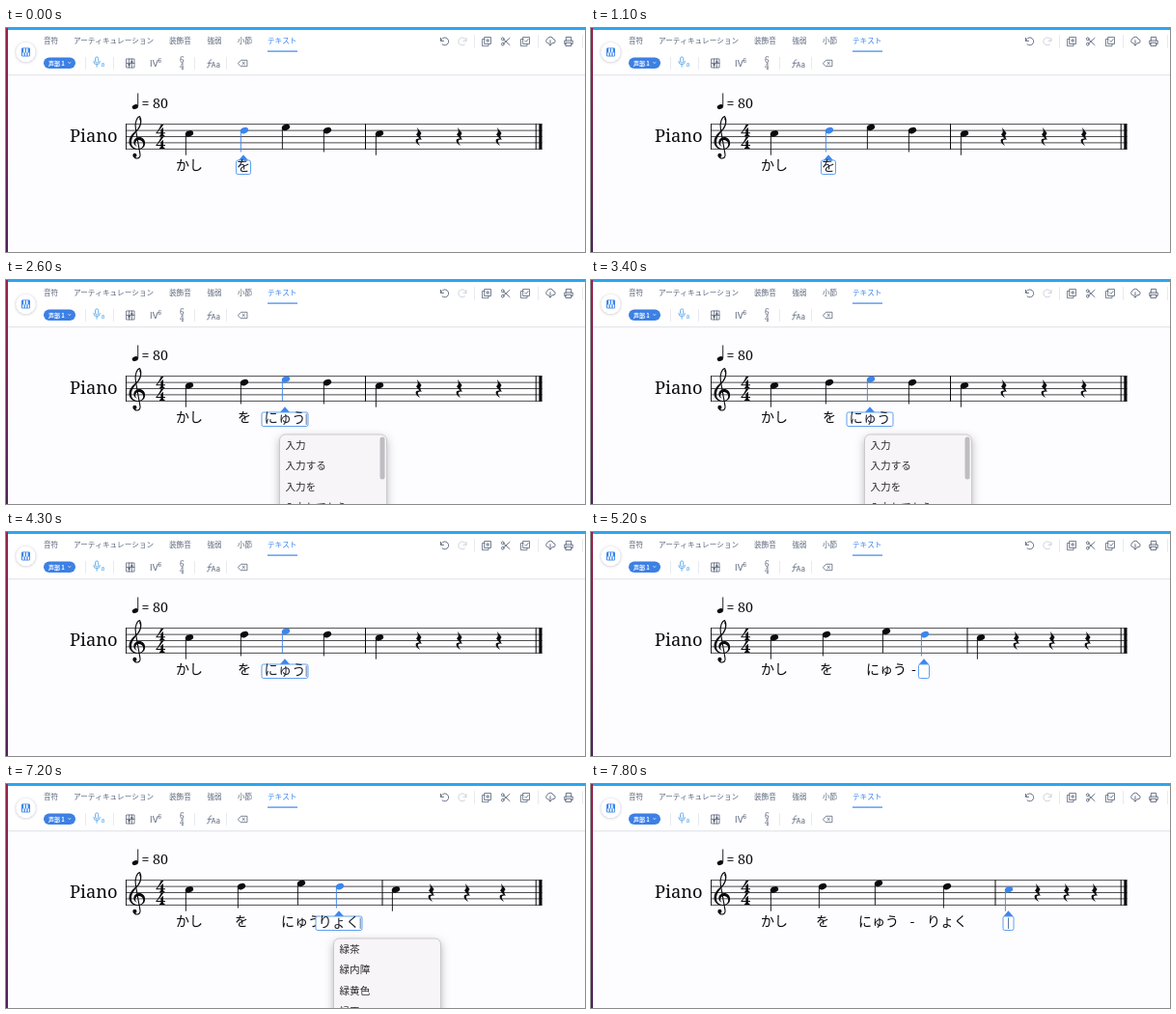
Animation of 600 by 232 pixels, one loop 7900 ms. Source, as an HTML page with a canvas:

```html
<!DOCTYPE html>
<html lang="ja">
<head>
<meta charset="utf-8">
<title>Lyrics input</title>
<style>
  html, body { margin: 0; width: 100%; height: 100%; overflow: hidden; background: #fdfcfe; }
  canvas { display: block; }
</style>
</head>
<body>
<canvas id="stage" width="600" height="232"></canvas>
<script>
const ctx = document.getElementById('stage').getContext('2d');
const LOOP = 7900;
const BLUE = '#3b86ee', INK = '#0b0b0d', SLATE = '#59647a', PALE = '#c9ced8';
const SANS = '"Noto Sans CJK JP", "Noto Sans CJK", sans-serif';
const SERIF = '"Noto Serif", serif';
const STAFF_TOP = 99.7, GAP = 6.4;

// Horizontal spacing of the measure as the lyrics grow.
const LAYOUTS = [
  { notes: [190, 247, 290, 333, 387], bar: 372.5, rests: [428, 470, 511] },
  { notes: [190, 244, 306, 346, 404], bar: 390, rests: [441, 478, 515], hyphen: 334.5 },
  { notes: [190, 240, 298, 369, 433], bar: 419, rests: [463, 493, 522], hyphen: 333 }
];
const STEPS = [1.5, 1, 0.5, 1, 1.5];
const LYRICS = ['かし', 'を', 'にゅう', 'りょく'];

const NYU = ['ニュース', '入力', '入荷', '入院'];
const NYUU = ['入力', '入力する', '入力を', '入力してから'];
const RYO = ['旅行', '料理', '両方', '料金'];
const RYOKU = ['緑茶', '緑内障', '緑黄色', '緑玉'];

// Each state: start time, layout, selected note, typed text, box width, candidates.
const STATES = [
  { at: 0, layout: 0, note: 1, text: 'を', width: 16, steady: true },
  { at: 1400, layout: 0, note: 2, text: '', width: 12 },
  { at: 1800, layout: 0, note: 2, text: 'n', width: 12 },
  { at: 2100, layout: 0, note: 2, text: 'ny', width: 19 },
  { at: 2300, layout: 0, note: 2, text: 'にゅ', width: 34, list: NYU },
  { at: 2600, layout: 0, note: 2, text: 'にゅう', width: 49, list: NYUU, scrolls: true },
  { at: 4100, layout: 0, note: 2, text: 'にゅう', width: 49 },
  { at: 4400, layout: 1, note: 3, text: '', width: 12 },
  { at: 6300, layout: 1, note: 3, text: 'r', width: 12 },
  { at: 6450, layout: 1, note: 3, text: 'ry', width: 17 },
  { at: 6600, layout: 1, note: 3, text: 'りょ', width: 34, list: RYO },
  { at: 6850, layout: 1, note: 3, text: 'りょk', width: 42, list: RYO },
  { at: 7000, layout: 1, note: 3, text: 'りょく', width: 49, list: RYOKU },
  { at: 7300, layout: 1, note: 3, text: 'りょく', width: 49 },
  { at: 7400, layout: 2, note: 4, text: '', width: 12 }
];

const CLEF_FILL = new Path2D(
  'M2.6-27.8C5-26 5-19 2.5-15.5C-.5-11-6.2-7-6 0C-5.8 4-2.5 6.2 1 6.2L1 6.9' +
  'C-5 7.2-8.6 3-8.5-1.5C-8.3-8.5-1.5-11.5 1.2-16C3-19 3.8-22.5 2.2-24.5Z' +
  'M1 6.9C5.5 6.6 8.2 4 8.1.3C8-3.5 5.2-6 1.8-5.8C-1.6-5.6-4-3-3.6 0C-3.3 2-1.8 3.4-.2 3.8' +
  'C-1.4 2.8-2 1.8-1.9.3C-1.8-1.6 0-3 1.9-2.8C4.6-2.6 6.2-.8 6.2 1.6C6.2 4.4 4 6 1 6.2Z');
const CLEF_SPINE = new Path2D('M-3.5 13.5C-3 17 3.6 17.5 3 12L-1.6-14C-3-21 0-27 2.6-27.3');
const FOUR = new Path2D(
  'M5.2.2L8 .2C6 3 3 6.5 1.4 8.6L5 8.6L5 5.5L7.6 3.2L7.6 8.6L9.6 8.6L9.6 9.6L7.6 9.6' +
  'C7.6 11 8 11.6 9.2 11.8L9.2 12.5L3.6 12.5L3.6 11.8C4.7 11.6 5 11 5 9.6L0 9.6L0 8.8C2.2 6.5 4.2 3.2 5.2.2Z');
const REST = new Path2D(
  'M-2.2-9.7L2.6-3.6C.8-1.4.8 0 3.2 3.6C1 2.6-1.4 3.2-1.2 5.2C-1 6.8.4 8 1 9.4' +
  'C-1.6 8-3.6 6-3.4 4C-3.2 2.2-1 1.6.6 2.3L-3-2.2C-.8-4.2-.8-6-2.2-9.7Z');

function rect(x, y, w, h, color) {
  ctx.fillStyle = color;
  ctx.fillRect(x, y, w, h);
}

function roundRect(x, y, w, h, r, fill, stroke) {
  ctx.beginPath();
  ctx.roundRect(x, y, w, h, r);
  if (fill) { ctx.fillStyle = fill; ctx.fill(); }
  if (stroke) { ctx.strokeStyle = stroke; ctx.lineWidth = 1; ctx.stroke(); }
}

function disc(x, y, r, color) {
  ctx.fillStyle = color;
  ctx.beginPath();
  ctx.arc(x, y, r, 0, Math.PI * 2);
  ctx.fill();
}

function label(text, x, y, font, color, align = 'left') {
  ctx.font = font;
  ctx.fillStyle = color;
  ctx.textAlign = align;
  ctx.fillText(text, x, y);
}

function fillAt(path, x, y, color = INK) {
  ctx.save();
  ctx.translate(x, y);
  ctx.fillStyle = color;
  ctx.fill(path);
  ctx.restore();
}

function strokeAt(path, x, y, color, width = 0.9) {
  ctx.save();
  ctx.translate(x, y);
  ctx.strokeStyle = color;
  ctx.lineWidth = width;
  ctx.lineCap = ctx.lineJoin = 'round';
  ctx.stroke(path);
  ctx.restore();
}

const icon = (d, x, y, color = SLATE, width) => strokeAt(new Path2D(d), x, y, color, width);

function shadowed(blur, dy, color, draw) {
  ctx.save();
  ctx.shadowBlur = blur;
  ctx.shadowOffsetY = dy;
  ctx.shadowColor = color;
  draw();
  ctx.restore();
}

function drawFrame() {
  rect(0, 0, 600, 232, '#fdfcfe');
  rect(0, 0, 600, 48, '#fff');
  rect(0, 48, 600, 1, '#e5e6eb');
  rect(0, 49, 600, 1, '#f6f5f9');
  rect(0, 0, 600, 2, '#2ba4ec');
  const edge = ctx.createLinearGradient(0, 0, 0, 232);
  edge.addColorStop(0, '#98204a');
  edge.addColorStop(1, '#4b2259');
  rect(0, 0, 2, 232, edge);
}

function drawTabs() {
  const tabs = [['音符', 39], ['アーティキュレーション', 70], ['装飾音', 169], ['強弱', 208.5], ['小節', 240], ['テキスト', 271]];
  tabs.forEach(([text, x], i) =>
    label(text, x, 16.4, `500 7.6px ${SANS}`, i === 5 ? BLUE : SLATE));
  rect(271, 23.5, 31, 1.2, BLUE);

  shadowed(3, 0.5, 'rgba(60,70,100,.35)', () => disc(20.5, 25, 10.3, '#fff'));
  roundRect(16, 20.5, 9, 9, 1.2, BLUE);
  for (const x of [17, 19.8, 22.6]) rect(x, 25.5, 1.5, 3.2, '#fff');
  for (const x of [18.2, 21]) rect(x, 21.2, 1.6, 4.3, '#fff');
}

function drawTools() {
  roundRect(39, 30.5, 33, 11.5, 5.75, '#3d80e4');
  label('声部 1', 44, 38.6, `700 6px ${SANS}`, '#fff');
  icon('M0 0L1 1L2 0', 64.8, 35.6, '#fff', 0.8);
  for (const x of [82, 111, 195, 228]) rect(x, 30, 0.8, 13, '#e3e5eb');

  icon('M-2 -4.5a1.6 1.6 0 0 1 3.2 0v3a1.6 1.6 0 0 1-3.2 0zM-3.7 -1.5a3.3 3.3 0 0 0 6.6 0M-.4 2v2.3', 94.5, 36, '#4aa0ea', 0.8);
  label('a', 98.5, 40, '6.5px "Noto Sans", sans-serif', '#4aa0ea');

  icon('M-4 -4.5h8v9h-8zM-1.4 -4.5v9M1.4 -4.5v9M-4 0h8', 129, 36.5, SLATE, 0.8);
  for (const x of [-1.4, 1.4]) disc(129 + x, 36.5 - x, 1.2, SLATE);
  label('IV', 149, 40, '9.5px Inter, sans-serif', SLATE);
  label('6', 157.6, 36, '6px Inter, sans-serif', SLATE);
  label('6', 182.3, 36, `8px ${SERIF}`, SLATE, 'center');
  label('4', 182.3, 43, `8px ${SERIF}`, SLATE, 'center');
  icon('M2 -4.5C-.2-5-.2-3-.6 0S-1.6 4-2.6 3.4M-2 -1.2h4', 211, 37.5, SLATE, 0.8);
  label('Aa', 212.6, 40.5, '7.5px Inter, sans-serif', SLATE);
  icon('M-4.8 0L-2 -3.2H4.4V3.2H-2ZM-.6 -1.3L2 1.3M2 -1.3L-.6 1.3', 245.5, 36.5, SLATE, 0.8);
}

function drawActions() {
  const undo = 'M-4 -3.6V-.6H-1M-3.8 -.8A4 4 0 1 1 -2.4 3';
  icon(undo, 454.5, 14);
  ctx.save();
  ctx.translate(473, 14);
  ctx.scale(-1, 1);
  icon(undo, 0, 0, PALE);
  ctx.restore();
  for (const x of [485, 551, 597]) rect(x, 7, 0.8, 14, '#e3e5eb');

  const sheets = 'M-2 -4.5H4.5V2.5H-2ZM-2 -2.5H-4.5V4.7H2V2.5';
  icon(sheets + 'M1.2 -2.8V.8M-.6 -1H3', 498, 14, SLATE, 0.8);
  icon(sheets + 'M-.4 -1L.9 .3L3.2 -2.4', 538, 14, SLATE, 0.8);
  icon('M-2.2 -1.8L4 3.6M-2.2 1.8L4 -3.6M-1.8 -2.7a1.4 1.4 0 1 1-2.8 0a1.4 1.4 0 1 1 2.8 0M-1.8 2.7a1.4 1.4 0 1 1-2.8 0a1.4 1.4 0 1 1 2.8 0', 518, 14);
  icon('M-2 2.2H-2.6A2.3 2.3 0 0 1-2.8 -2.2A3 3 0 0 1 3 -2A2.1 2.1 0 0 1 3 2.2H2M0 -.8V4.6M-1.6 3L0 4.6L1.6 3', 564, 13.5);
  icon('M-2.7 -1V-4.6H2.7V-1M-2.7 2.6H-4.2V-1H4.2V2.6H2.7M-2.7 1.2H2.7V4.6H-2.7Z', 583, 14);
}

function drawNote(x, step, color) {
  const y = STAFF_TOP + step * GAP;
  ctx.fillStyle = color;
  ctx.beginPath();
  ctx.ellipse(x, y, 4.3, 3, -0.38, 0, Math.PI * 2);
  ctx.fill();
  rect(x - 4.1, y + 0.6, 0.9, 21.8, color);
}

function drawStaff(layout, selected) {
  label('Piano', 66, 118, `18.3px ${SERIF}`, INK);
  ctx.fillStyle = INK;
  ctx.beginPath();
  ctx.ellipse(133.8, 81.6, 3.2, 2.3, -0.38, 0, Math.PI * 2);
  ctx.fill();
  rect(136.3, 67.5, 0.9, 13.6, INK);
  label('= 80', 140.5, 83.2, `14.2px ${SERIF}`, INK);

  for (let i = 0; i < 5; i++) rect(124, STAFF_TOP - 0.4 + i * GAP, 431.5, 0.8, '#222');
  const height = 4 * GAP + 0.8, top = STAFF_TOP - 0.4;
  rect(124, top, 0.9, height, INK);
  rect(layout.bar - 0.5, top, 1, height, INK);
  rect(548.7, top, 1, height, INK);
  rect(552.3, top, 3.2, height, INK);

  const g = STAFF_TOP + 3 * GAP;
  fillAt(CLEF_FILL, 136, g);
  strokeAt(CLEF_SPINE, 136, g, INK, 1.1);
  disc(133.4, g + 13, 2.1, INK);
  fillAt(FOUR, 155.4, STAFF_TOP);
  fillAt(FOUR, 155.4, STAFF_TOP + 2 * GAP);

  layout.notes.forEach((x, i) => drawNote(x, STEPS[i], i === selected ? BLUE : INK));
  for (const x of layout.rests) fillAt(REST, x, STAFF_TOP + 2 * GAP);
}

function drawLyrics(layout, count) {
  const font = `14px ${SANS}`;
  for (let i = 0; i < count; i++) label(LYRICS[i], layout.notes[i], 147.3, font, INK, 'center');
  if (layout.hyphen) label('-', layout.hyphen, 147.3, font, INK, 'center');
}

function drawInput(state, x, caretOn) {
  const left = x - state.width / 2;
  ctx.fillStyle = BLUE;
  ctx.beginPath();
  ctx.moveTo(x, 131.3);
  ctx.lineTo(x + 5, 137);
  ctx.lineTo(x - 5, 137);
  ctx.fill();
  roundRect(left + 0.5, 137, state.width - 1, 14.5, 1.8, '#fff', '#5f9fee');
  const latin = /^[a-z]+$/.test(state.text);
  const font = latin ? `13.5px ${SERIF}` : `14.3px ${SANS}`;
  label(state.text, x, latin ? 148.8 : 147.5, font, '#1d2230', 'center');
  if (caretOn) {
    const caret = state.text ? left + state.width - 2.4 : x;
    rect(caret - 0.4, 138.5, 0.9, 11.5, '#4a6a9c');
  }
}

function drawCandidates(state, x) {
  const left = x - 6;
  shadowed(9, 3, 'rgba(0,0,0,.28)', () => roundRect(left, 160, 112, 90, 6, '#f7f5f8'));
  roundRect(left + 0.5, 160, 111, 90, 6, null, '#cbc9ce');
  state.list.forEach((text, i) =>
    label(text, left + 6.5, 174.7 + i * 21.5, `500 10.6px ${SANS}`, '#2b2a2e'));
  if (state.scrolls) roundRect(left + 104.5, 162.5, 5, 44, 2.5, '#bfbdc2');
}

function render(time) {
  const t = time % LOOP;
  const state = STATES.findLast(s => s.at <= t);
  const layout = LAYOUTS[state.layout];
  const x = layout.notes[state.note] - (state.note === 4 ? 0.5 : 1);
  const caretOn = !state.steady && (t - state.at) % 1000 < 500;

  drawFrame();
  drawTabs();
  drawTools();
  drawActions();
  drawStaff(layout, state.note);
  drawLyrics(layout, state.note);
  drawInput(state, x, caretOn);
  if (state.list) drawCandidates(state, x);
}

const start = performance.now();
function tick() {
  render(performance.now() - start);
  requestAnimationFrame(tick);
}
tick();
</script>
</body>
</html>
```
